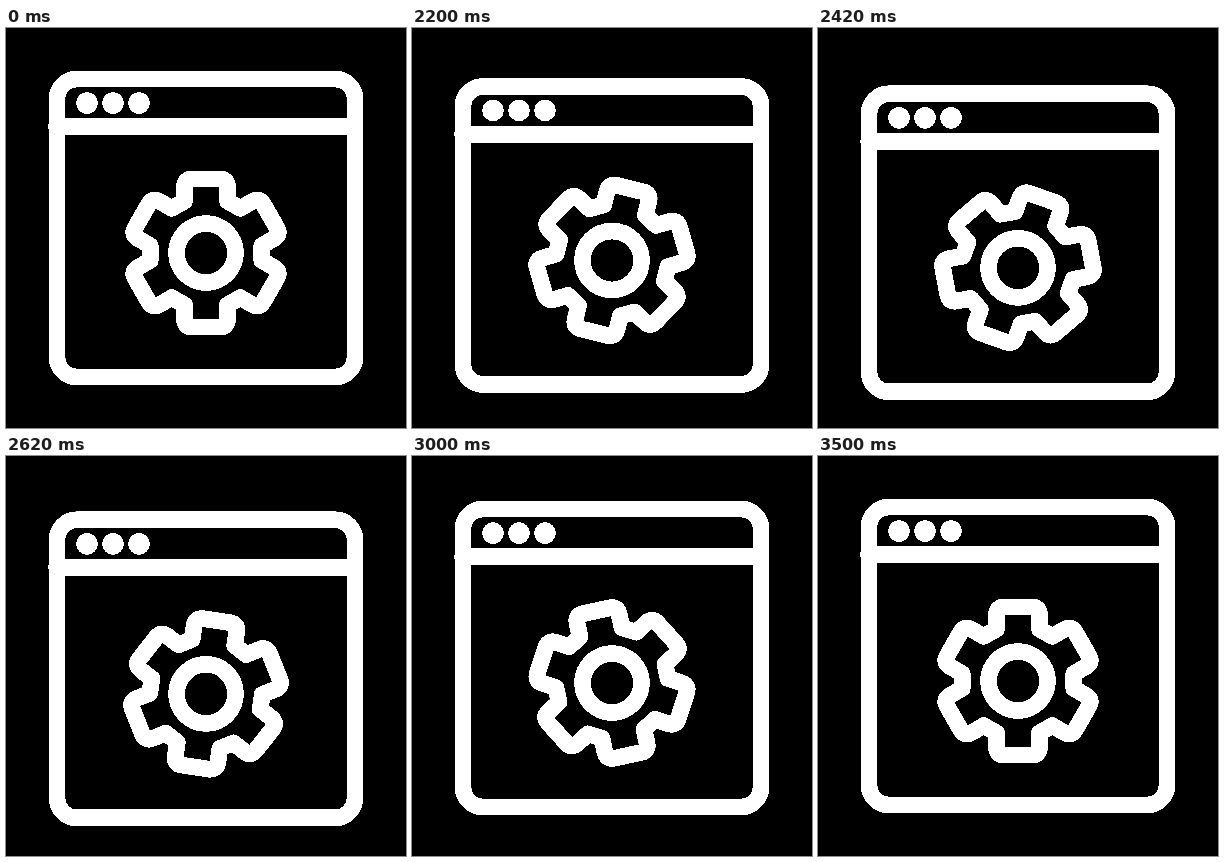
An HTML page for the animation above (3.52 s loop, 400 by 400 pixels).

```html
<!DOCTYPE html>
<html lang="en">
<head>
<meta charset="utf-8">
<title>Browser settings icon</title>
<style>
  html, body { margin: 0; width: 100%; height: 100%; overflow: hidden; background: #000; }
  svg { display: block; width: 100vw; height: 100vh; }
  .line { fill: none; stroke: #fff; stroke-width: 16; stroke-linecap: round; stroke-linejoin: round; }
</style>
</head>
<body>
<svg viewBox="0 0 400 400">
  <!-- Hard edges: nearly every partly covered pixel turns white -->
  <filter id="hard" filterUnits="userSpaceOnUse" x="0" y="0" width="400" height="400">
    <feComponentTransfer><feFuncA type="linear" slope="20" intercept="-2"/></feComponentTransfer>
  </filter>
  <g filter="url(#hard)">
    <g id="win">
      <rect class="line" x="51" y="51" width="298" height="298" rx="20"/>
      <path class="line" d="M50.5 98.75H348.8"/>
      <g fill="#fff">
        <circle cx="81" cy="75" r="10.5"/>
        <circle cx="107" cy="75" r="10.5"/>
        <circle cx="133" cy="75" r="10.5"/>
      </g>
      <g transform="translate(200 225)">
        <circle class="line" r="29.5"/>
        <path class="line" id="gear"/>
      </g>
    </g>
  </g>
</svg>
<script>
const LOOP = 3520, HOLD = 2000, STEP = 25, LENGTH = 1500;
const DIP = 14.75, DIP_TIME = 400, TURN = 180;
const win = document.getElementById('win');
const gear = document.getElementById('gear');

// Six equal teeth, each with two rounded corners
function gearPath() {
  const half = 21.5, top = -74, base = -52, r = 8;
  const tooth = [
    [-half, base], [-half, top + r], [-half, top], [-half + r, top],
    [half - r, top], [half, top], [half, top + r], [half, base]
  ];
  let d = '';
  for (let k = 0; k < 6; k++) {
    const c = Math.cos(k * Math.PI / 3), s = Math.sin(k * Math.PI / 3);
    const p = tooth.map(([x, y]) => (x * c - y * s).toFixed(2) + ' ' + (x * s + y * c).toFixed(2));
    d += `${k ? 'L' : 'M'}${p[0]}L${p[1]}Q${p[2]} ${p[3]}L${p[4]}Q${p[5]} ${p[6]}L${p[7]}`;
  }
  return d + 'Z';
}

// cubic-bezier(x1, 0, x2, 1)
function ease(p, x1, x2) {
  if (p <= 0) return 0;
  if (p >= 1) return 1;
  let lo = 0, hi = 1, u;
  for (let i = 0; i < 30; i++) {
    u = (lo + hi) / 2;
    const v = 1 - u;
    const x = 3 * x1 * u * v * v + 3 * x2 * u * u * v + u * u * u;
    if (x < p) lo = u; else hi = u;
  }
  return u * u * (3 - 2 * u);
}

// Steps alternate between 20 and 30 ms
function stepAt(ms) {
  const t = ms - HOLD;
  return t < 0 ? 0 : 2 * Math.floor(t / 50) + (t % 50 >= 20 ? 1 : 0);
}

function draw(now) {
  const t = stepAt(now % LOOP) * STEP;
  const y = t < DIP_TIME
    ? DIP * ease(t / DIP_TIME, 1 / 3, 2 / 3)
    : DIP * (1 - ease((t - DIP_TIME) / (LENGTH - DIP_TIME), 0.45, 0.1));
  const angle = TURN * ease(t / LENGTH, 1 / 3, 0.15);
  win.setAttribute('transform', `translate(0 ${y.toFixed(3)})`);
  gear.setAttribute('transform', `rotate(${angle.toFixed(3)})`);
}

gear.setAttribute('d', gearPath());
const start = performance.now();
function tick() {
  draw(performance.now() - start);
  requestAnimationFrame(tick);
}
tick();
</script>
</body>
</html>
```
